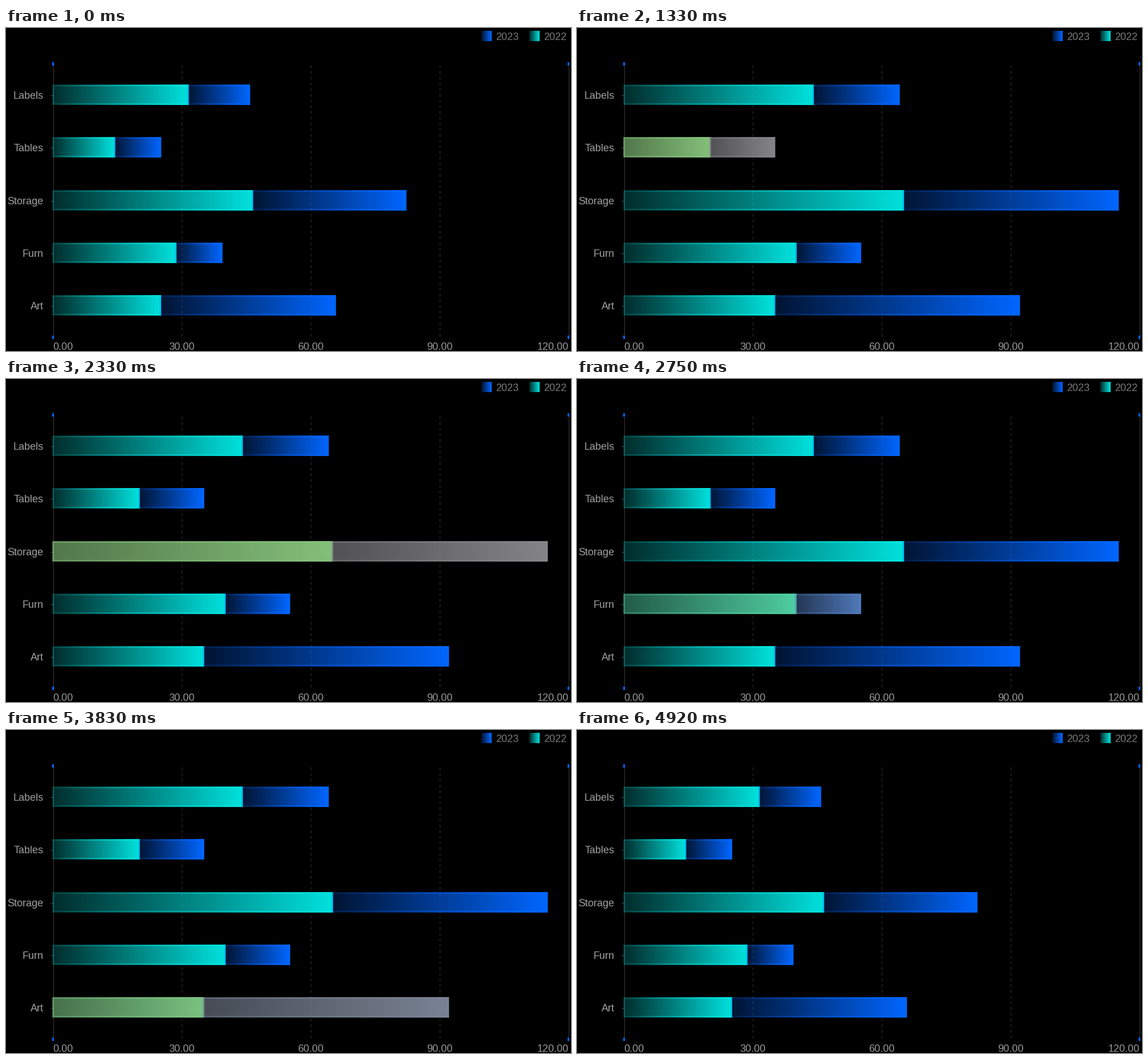
Animation, 990 px wide and 566 px high, one loop 5010 ms. Source, as a matplotlib script:

```python
import numpy as np
import matplotlib.pyplot as plt
from matplotlib.animation import FuncAnimation
from matplotlib.patches import Rectangle

W, H, DPI = 990, 566, 100
PX = 72 / DPI
AXIS_X, UNIT = 82.5, 7.525          # left axis and pixels per value
LEFT, COLS, BAR_H, STROKE = 80, 872, 36, 3
CYAN, BLUE, ORANGE = (np.array(c) / 255 for c in
                      [(0, 226, 222), (0, 102, 255), (255, 162, 30)])
DATA = [("Labels", 44, 20), ("Tables", 20, 15), ("Storage", 65, 50),
        ("Furn", 40, 15), ("Art", 35, 57)]
STEP = 1000 / 12
# Steps at which the picture is refreshed; it holds in between.
REFRESH = [0, 1, 2, 3, 16, 18, 20, 21, 24, *range(26, 57), 59]

plt.rcParams["font.family"] = "Liberation Sans"
fig = plt.figure(figsize=(W / DPI, H / DPI), dpi=DPI, facecolor="black")
ax = fig.add_axes([0, 0, 1, 1])
ax.axis("off")


def label(x, y, text, ha, color):
    ax.text(x, y, text, ha=ha, va="baseline", size=18 * PX, color=color)


def line(xs, ys, color, **style):
    ax.plot(xs, ys, color=color, lw=PX, solid_capstyle="butt",
            dash_capstyle="butt", zorder=1, **style)


def cover(n, lo, hi):
    """Share of each of n unit cells that lies between lo and hi."""
    k = np.arange(n)
    return np.clip(hi - k, 0, 1) - np.clip(lo - k, 0, 1)


def box(lo, hi, inset):
    return np.outer(cover(BAR_H, inset, BAR_H - inset),
                    cover(COLS, lo + inset, hi - inset))


def paint_segment(canvas, x0, x1, color, glow):
    """Gradient fill plus a centred gradient stroke, on premultiplied RGBA."""
    half = STROKE / 2
    lo, hi = x0 - half - LEFT, x1 + half - LEFT
    t = np.clip((np.arange(COLS) + 0.5 + LEFT - x0) / (x1 - x0), 0, 1)
    alpha = (0.2 + 0.8 * t) * (1 - glow) + glow
    rgba = np.append(color * (1 - glow) + ORANGE * glow, 1)
    fill = box(lo, hi, half)
    stroke = box(lo, hi, 0) - box(lo, hi, STROKE)
    for shape in (fill, stroke):
        a = (shape * alpha)[..., None]
        canvas[:] = canvas * (1 - a) + rgba * a


def bar_pixels(first, second, grow, glow):
    canvas = np.zeros((BAR_H, COLS, 4))
    x1 = AXIS_X + first * UNIT * grow
    x2 = AXIS_X + (first + second) * UNIT * grow
    paint_segment(canvas, AXIS_X, x1, CYAN, glow)
    paint_segment(canvas, x1, x2, BLUE, glow)
    canvas[..., :3] /= np.maximum(canvas[..., 3:], 1e-6)
    return (np.clip(canvas, 0, 1) * 255 + 0.5).astype(np.uint8)


def growth(step):
    x = min(0.341 + 0.22 * (step % 59), 1)
    return 1 - (1 - x) ** 3


def glow_of(bar, step):
    """Each bar pulses to orange and back for one second in turn."""
    if step == 59:
        return 0
    start = 0 if bar == 0 else 595 + 1000 * (bar - 1)
    phase = (step * STEP - start) / 1000
    if bar == 0 and step > 3:
        return 0
    return max(0, 1 - abs(2 * phase - 1))


# Axes and grid
for value in range(0, 121, 30):
    x = AXIS_X + value * UNIT
    if value in (0, 120):
        line([x, x], [66, 539], "#3a3a3a")
        for y in (59.5, 538.5):
            ax.add_patch(Rectangle((x - 1.5, y), 3, 6, color=BLUE, lw=0, zorder=4))
    else:
        line([x, x], [65, 540], "#33332b", dashes=(5, 5))
    ha = {0: "left", 120: "right"}.get(value, "center")
    label(x, 564, f"{value:.2f}", ha, "#999999")

# Legend
for x, name, color in [(832.5, "2023", BLUE), (916.5, "2022", CYAN)]:
    ramp = np.ones((1, 18, 4))
    ramp[..., :3] = color
    ramp[..., 3] = np.linspace(0.2, 1, 18)
    ax.imshow(ramp, extent=(x, x + 17.5, 23, 5.5), interpolation="nearest",
              aspect="auto")
    label(x + 26, 21, name, "left", "#7a7a7a")

# Bars
images = []
for i, (name, *_) in enumerate(DATA):
    top = round(99 + 92.25 * i)
    line([77, 82], [top + 18.5] * 2, "#444444")
    label(65.5, top + 25, name, "right", "#a0a0a0")
    images.append(ax.imshow(np.zeros((BAR_H, COLS, 4), np.uint8),
                            extent=(LEFT, LEFT + COLS, top + BAR_H, top),
                            interpolation="nearest", aspect="auto", zorder=3))
ax.set_xlim(0, W)
ax.set_ylim(H, 0)

FRAMES, INTERVAL = 167, 30
cache = {}


def update(frame):
    now = min(int((frame * INTERVAL + 25) / STEP), 59)
    step = max(s for s in REFRESH if s <= now)
    if step not in cache:
        cache[step] = [bar_pixels(a, b, growth(step) if step in (0, 1, 2, 59) else 1,
                                  glow_of(i, step))
                       for i, (_, a, b) in enumerate(DATA)]
    for image, pixels in zip(images, cache[step]):
        image.set_data(pixels)
    return images


anim = FuncAnimation(fig, update, frames=FRAMES, interval=INTERVAL,
                     repeat=True, repeat_delay=0, blit=False)
plt.show()
```
